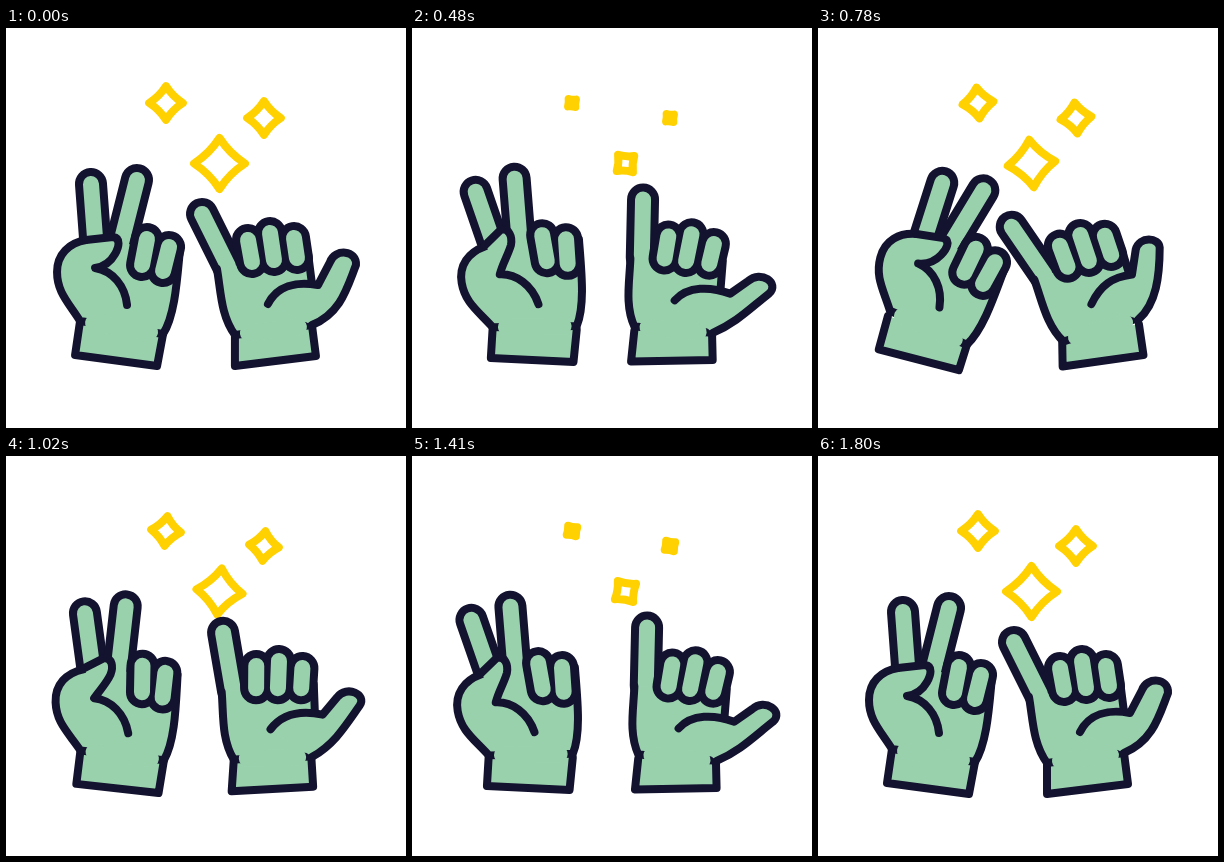
An HTML page without scripts for the animation above (3.83 s loop, 400 px wide and 400 px high).

```html
<!DOCTYPE html>
<html lang="en">
<head>
<meta charset="utf-8">
<title>Waving hands</title>
<style>
html, body { margin: 0; width: 100%; height: 100%; overflow: hidden; background: #fff; }
svg { display: block; width: 100%; height: 100%; }

/* Every moving part swings between rest, --out and --in */
.hand, .finger, .forearm, .thumb, .star {
  animation: swing 3830ms cubic-bezier(.25, .35, .55, 1) infinite;
}
@keyframes swing {
  0%, 47%, 100% { rotate: 0deg; }
  12.53%, 33.68%, 36.81% { rotate: var(--out); }
  20.37% { rotate: var(--in); }
}
@keyframes morph {
  0%, 47%, 100% { d: var(--rest); }
  12.53%, 33.68%, 36.81% { d: var(--out); }
  20.37% { d: var(--in); }
}
/* Hands drift together on the first wave, apart on the second */
@keyframes drift {
  0%, 26.63%, 36.81%, 100% { translate: 0px; }
  6.27% { translate: calc(10px * var(--side)); }
  12.53% { translate: calc(4px * var(--side)); }
  20.37% { translate: var(--slide); }
  33.68% { translate: calc(-11px * var(--side)); }
}

path { --in: 0deg; --out: 0deg; }
.hand { animation-name: swing, drift; fill: none; stroke: #13132f; stroke-width: 8; stroke-linecap: round; stroke-linejoin: round; }
.left { --side: 1; --slide: 0px; --in: 15deg; --out: -10deg; transform-origin: 112px 280px; }
.right { --side: -1; --slide: 13px; --in: -10deg; --out: 12deg; transform-origin: 268px 290px; }

.palm, .forearm, .thumb { fill: #9ad1ad; }
.edge { stroke-width: 32; }
.skin { stroke: #9ad1ad; stroke-width: 16; }
.left .forearm { --in: -8deg; --out: 5deg; transform-origin: 115px 300px; }
.right .forearm { --in: 9deg; --out: -6deg; transform-origin: 268px 302px; }

.l-index { d: path("M85 156L89 210"); --in: 7deg; --out: -5deg; transform-origin: 89px 210px; }
.l-middle { d: path("M131 152L115 215"); --in: 2deg; --out: -9deg; transform-origin: 115px 215px; }
.l-ring { d: path("M141 211L136 237"); --out: -11deg; transform-origin: 138px 224px; }
.l-pinky { d: path("M163 219L157 243"); --out: -8deg; transform-origin: 160px 231px; }

.r-pinky { d: path("M196 186L222 238"); --in: 2deg; --out: 16deg; transform-origin: 222px 238px; }
.r-ring { d: path("M242 212L246 234"); --out: 8deg; transform-origin: 244px 223px; }
.r-middle { d: path("M264 205L268 232"); --out: 8deg; transform-origin: 266px 218px; }
.r-index { d: path("M288 210L291 230"); --out: 10deg; transform-origin: 290px 220px; }

.thumb { animation-name: morph; }
.left .thumb {
  --rest: path("M80 212L107 209C115 210 113 219 109 226C104 235 96 239 89 240C107 243 119 258 121 277");
  --out: path("M80 211L99 198C107 198 109 207 106 215C101 225 95 231 90 242C106 244 120 258 123 278");
  --in: var(--rest);
}
.right .thumb {
  --rest: path("M306 297C335 285 341 260 350 237C351 222 329 220 324 234L312 257C290 253 271 258 262 276");
  --out: path("M307 297C328 282 338 266 354 247C363 235 341 225 331 239L316 255C295 252 273 256 263 273");
  --in: path("M307 298C327 286 335 259 340 231C341 221 322 216 316 229L308 253C288 252 275 258 263 275");
}

/* Sparkles: two quarter turns, shrinking midway */
.star { --min: .38; animation-name: spin, twinkle; animation-timing-function: cubic-bezier(.4, .1, .6, .9), ease-in-out; fill: none; stroke: #ffd100; stroke-width: 8; stroke-linejoin: round; }
.small { --min: .22; }
@keyframes spin {
  0% { rotate: 0deg; }
  23.5% { rotate: 90deg; }
  47%, 100% { rotate: 180deg; }
}
@keyframes twinkle {
  0%, 23.5%, 47%, 100% { scale: 1; }
  11.75%, 35.25% { scale: var(--min); animation-timing-function: ease-out; }
}
</style>
</head>
<body>
<svg viewBox="0 0 400 400">
  <defs>
    <path id="star" vector-effect="non-scaling-stroke" d="M0-25.5Q10-10 25.5 0Q10 10 0 25.5Q-10 10-25.5 0Q-10-10 0-25.5Z"/>
  </defs>
  <g transform="translate(160 75) scale(.66)"><use href="#star" class="star small"/></g>
  <g transform="translate(258 90) scale(.66)"><use href="#star" class="star small"/></g>
  <g transform="translate(213.5 135.5)"><use href="#star" class="star"/></g>

  <g class="hand left">
    <path class="finger l-index edge"/><path class="finger l-index skin"/>
    <path class="finger l-middle edge"/><path class="finger l-middle skin"/>
    <path class="forearm" d="M74 293L69 327L151 338L157 306"/>
    <path class="palm" d="M174 221C171 252 169 287 157 306L74 293C62 274 51 264 51 244C51 226 63 215 80 212"/>
    <path class="thumb"/>
    <path class="skin" d="M87 295L144 304"/>
    <path class="finger l-ring edge"/><path class="finger l-pinky edge"/>
    <path class="finger l-ring skin"/><path class="finger l-pinky skin"/>
  </g>

  <g class="hand right">
    <path class="finger r-pinky edge"/><path class="finger r-pinky skin"/>
    <path class="forearm" d="M229 307L229 338L310 328L306 297"/>
    <path class="palm" d="M211 241C215 264 215 288 229 307L306 297L306 256L302 225"/>
    <path class="thumb"/>
    <path class="skin" d="M242 305L293 299"/>
    <path class="finger r-ring edge"/><path class="finger r-middle edge"/><path class="finger r-index edge"/>
    <path class="finger r-ring skin"/><path class="finger r-middle skin"/><path class="finger r-index skin"/>
  </g>
</svg>
</body>
</html>
```
